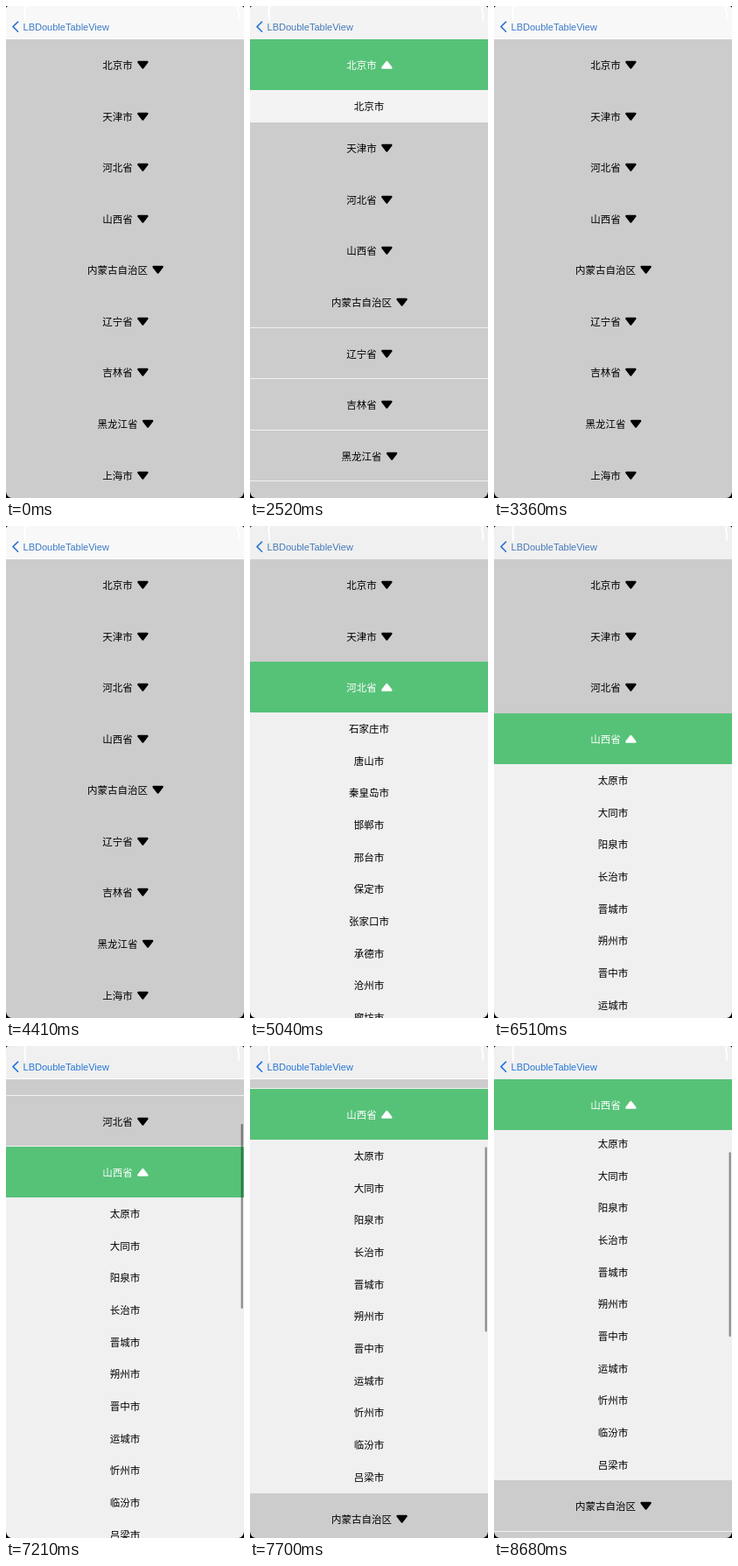
Write an HTML page that moves like this. It is 272x562 px and loops after 8.96 s.

```html
<!DOCTYPE html>
<html lang="zh-CN">
<head>
<meta charset="utf-8">
<title>Double table view</title>
<style>
  html, body { margin: 0; width: 100%; height: 100%; overflow: hidden; background: #ccc; }
  svg { display: block; width: 272px; height: 562px; }
  text { font: 11.5px "Noto Sans CJK SC", "Noto Sans CJK", "Noto Sans CJK JP", sans-serif; }
  .title { font: 11px "Liberation Sans", Arial, sans-serif; }
</style>
</head>
<body>
<script>
const LOOP = 8960, STEP = 70;
const NAV = 38, ROW = 58.57, BAND = 58, CELL = 36.65, SIZE = 11.5;

const provinces = [
  ['北京市', '北京市'],
  ['天津市', '天津市'],
  ['河北省', '石家庄市 唐山市 秦皇岛市 邯郸市 邢台市 保定市 张家口市 承德市 沧州市 廊坊市 衡水市'],
  ['山西省', '太原市 大同市 阳泉市 长治市 晋城市 朔州市 晋中市 运城市 忻州市 临汾市 吕梁市'],
  ['内蒙古自治区', ''], ['辽宁省', ''], ['吉林省', ''], ['黑龙江省', ''], ['上海市', '']
];

// [time, open section]; -1 is all closed
const taps = [[0, -1], [2520, 0], [3150, -1], [3850, 1], [4410, -1], [5040, 2], [5460, -1], [6510, 3]];
// [time, scroll offset]
const drag = [[6930, 0], [7070, 38], [7210, 98.6], [7420, 134], [7700, 164.5], [7840, 179]];

function el(parent, name, attrs = {}, text) {
  const node = document.createElementNS('http://www.w3.org/2000/svg', name);
  set(node, attrs);
  if (text) node.textContent = text;
  return parent.appendChild(node);
}
function set(node, attrs) {
  for (const key in attrs) node.setAttribute(key, attrs[key]);
}
const show = (node, on) => { node.style.display = on ? '' : 'none'; };
const move = (node, y) => node.setAttribute('transform', `translate(0 ${y})`);

const svg = el(document.body, 'svg', { viewBox: '0 0 272 562' });
el(svg, 'rect', { width: 272, height: 562, fill: '#ccc' });

const sections = provinces.map(([name, list]) => {
  const cities = list ? list.split(' ') : [];
  const root = el(svg, 'g');
  const cells = el(root, 'g');
  const back = el(cells, 'rect', { y: BAND, width: 272 });
  cities.forEach((city, i) => el(cells, 'text', {
    x: 136, y: ROW + (i + 0.5) * CELL + 4.3, 'text-anchor': 'middle'
  }, city));

  const seam = el(root, 'rect', { width: 272, height: 1, fill: '#f0f0f0' });
  const head = el(root, 'g');
  const fill = el(head, 'rect', { width: 272, height: BAND });
  const width = name.length * SIZE;
  const left = 136.5 - (width + 18) / 2;
  const label = el(head, 'text', { x: left, y: ROW / 2 + 4.4 }, name);
  const arrow = el(head, 'path', { d: 'M-5 -3.3H5L0 3.3Z', 'stroke-width': 2.4, 'stroke-linejoin': 'round' });
  return { root, cells, back, seam, fill, head, label, arrow, arrowX: left + width + 11.6, count: cities.length };
});

const bar = el(svg, 'rect', { x: 268.6, width: 2.2, height: 211, rx: 1.1, fill: '#000', 'fill-opacity': 0.43 });
const nav = el(svg, 'rect', { width: 272, height: NAV });
const edge = el(svg, 'rect', { y: 37, width: 272, height: 1, fill: '#fff' });
el(svg, 'path', { d: 'M23 0Q20 4 22 8V17M266 0Q264 4 266 8V17', fill: 'none', stroke: '#fff', 'stroke-width': 2 });
const chevron = el(svg, 'path', {
  d: 'M13.6 18.2L8 23.6L13.6 29.2', fill: 'none', 'stroke-width': 1.6,
  'stroke-linecap': 'round', 'stroke-linejoin': 'round'
});
const title = el(svg, 'text', { class: 'title', x: 19.6, y: 27.6 }, 'LBDoubleTableView');
// screen corners
el(svg, 'path', { d: 'M0 0H3Q0 0 0 3ZM272 0V3Q272 0 269 0ZM0 555V562H6Q1 561 0 555ZM272 555V562H266Q271 561 272 555Z' });

function offsetAt(t) {
  const next = drag.findIndex(p => p[0] > t);
  if (next === 0) return 0;
  if (next < 0) return drag[drag.length - 1][1];
  const [t0, a] = drag[next - 1], [t1, b] = drag[next];
  return a + (b - a) * (t - t0) / (t1 - t0);
}

function render(t) {
  const open = taps.filter(p => p[0] <= t).pop()[1];
  const scroll = offsetAt(t);
  const paper = open < 0 ? '#f8f8f8' : open < 2 ? '#f3f3f3' : '#f0f0f0';
  let y = NAV - scroll;

  sections.forEach((s, i) => {
    const active = i === open;
    const ink = active ? '#fff' : '#000';
    const top = Math.round(y);
    y += ROW + (active ? s.count * CELL : 0);
    const height = Math.round(y) - top;
    move(s.root, top);
    // pinned under the bar until its last cell pushes it out
    move(s.head, Math.max(0, Math.min(NAV - top, height - BAND)));
    show(s.cells, active);
    set(s.back, { fill: paper, height: height - BAND });
    set(s.fill, { fill: active ? '#56c278' : '#ccc' });
    set(s.label, { fill: ink });
    set(s.arrow, {
      fill: ink, stroke: ink,
      transform: `translate(${s.arrowX} ${ROW / 2}) scale(1 ${active ? -1 : 1})`
    });
    // the seam stays above the header fill
    set(s.seam, { y: height - 1 });
    s.root.append(s.seam);
    show(s.seam, scroll > 0 || (open >= 0 && i > 3));
  });

  show(bar, scroll > 0);
  set(bar, { y: 49.6 + scroll * 0.4 });
  set(nav, { fill: paper });
  show(edge, open < 0 || (scroll > 0 && scroll < 179));
  set(chevron, { stroke: scroll > 0 ? '#1f74dc' : '#2c76cf' });
  set(title, { fill: scroll > 0 ? '#2777d6' : open < 0 ? '#3d7bc6' : '#467ab9' });
}

const start = performance.now();
let last = -1;
function tick() {
  const t = Math.floor((performance.now() - start) % LOOP / STEP) * STEP;
  if (t !== last) render(last = t);
  requestAnimationFrame(tick);
}
tick();
</script>
</body>
</html>
```
